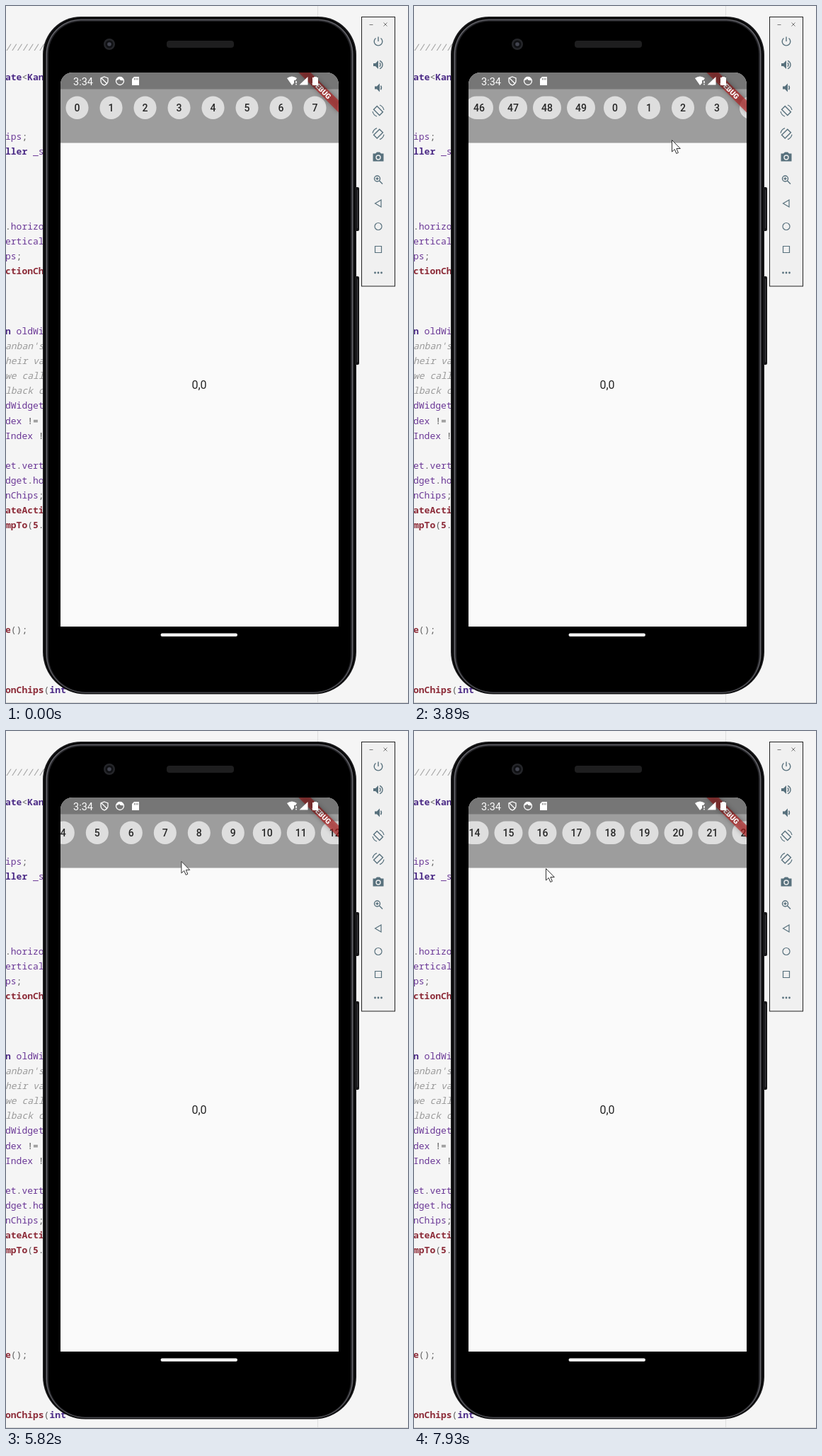
Recreate the animation shown at these times as an HTML page with a canvas. Size 568 by 985 pixels, loop 8 s.

```html
<!DOCTYPE html>
<html lang="en">
<head>
<meta charset="utf-8">
<title>Chip scroller</title>
<style>
html, body { margin: 0; width: 100%; height: 100%; overflow: hidden; background: #f5f5f5; }
canvas { display: block; }
</style>
</head>
<body>
<canvas id="stage" width="568" height="985"></canvas>
<script>
const ctx = document.getElementById('stage').getContext('2d');
const LOOP = 8000, PITCH = 48, CHIPS = 50, FIRST_CHIP = 100.5;
const SCREEN = { x: 77, y: 94, w: 393, h: 783 };
const ENTRY = { time: 910, at: [491, 961] };
const TOUCH_DELAY = 70, PRESS_LEAD = 60;

// The pointer curves past "via" to "from", then drags to "to"; the list follows by "shift" and coasts to "settle".
const SWIPES = [
  { arrive: 1600, start: 2343, release: 2575, settle: 2720, via: [353, 247], from: [182, 171], to: [350, 171], shift: 183.5 },
  { arrive: 3650, start: 3990, release: 4250, settle: 4440, via: [43, 70], from: [364, 189], to: [236, 186], shift: -126 },
  { arrive: 4510, start: 4580, release: 4810, settle: 5000, via: [320, 180], from: [352, 178], to: [228, 174], shift: -126 },
  { arrive: 5250, start: 5390, release: 5650, settle: 5850, via: [313, 133], from: [366, 184], to: [225, 190], shift: -144 },
  { arrive: 6290, start: 6440, release: 6834, settle: 7200, via: [255, 175], from: [374, 186], to: [190, 190], shift: -274 },
  { arrive: 7240, start: 7440, release: 7860, settle: 7930, via: [300, 180], from: [388, 187], to: [186, 194], shift: -200.5 }
];

const LINE_HEIGHT = 21.12;
const CODE = `///////

ate<Kan



ips;
ller _s




.horizo
ertical
ps;
ctionCh



n oldWi
anban's
heir va
we call
lback c
dWidget
dex !=
Index !

et.vert
dget.ho
nChips;
ateActi
mpTo(5.






e();



onChips(int`.split('\n');
const COMMENT = /^(\/\/|anban|heir|we |lback)/;
const KEYWORD = /^(ate|Kan|ller|n|int)$/;
const CALL = /^(ctionCh|ateActi|mpTo|5|e|onChips)$/;

const clamp = u => Math.min(1, Math.max(0, u));
const progress = (t, a, b) => clamp((t - a) / (b - a));
const easeOut = u => 1 - (1 - u) ** 2;
const mix = (p, q, u) => p.map((v, i) => v + (q[i] - v) * u);
const curve = (p, via, q, u) => mix(mix(p, via, u), mix(via, q, u), u);

function scrollAt(t) {
  return SWIPES.reduce((x, s) => x + s.shift * easeOut(progress(t, s.start + TOUCH_DELAY, s.settle)), FIRST_CHIP);
}
function pointerAt(t) {
  let { time, at } = ENTRY;
  for (const s of SWIPES) {
    if (t < s.arrive) return curve(at, s.via, s.from, progress(t, time, s.arrive));
    if (t < s.release) return mix(s.from, s.to, progress(t, s.start, s.release));
    time = s.release;
    at = s.to;
  }
  return at;
}

function fillRect(color, x, y, w, h) {
  ctx.fillStyle = color;
  ctx.fillRect(x, y, w, h);
}
function rounded(color, x, y, w, h, r) {
  ctx.fillStyle = color;
  ctx.beginPath();
  ctx.roundRect(x, y, w, h, r);
  ctx.fill();
}
function disc(color, x, y, r) {
  ctx.fillStyle = color;
  ctx.beginPath();
  ctx.arc(x, y, r, 0, Math.PI * 2);
  ctx.fill();
}
function text(str, x, y, font, color, align = 'center') {
  ctx.font = font;
  ctx.fillStyle = color;
  ctx.textAlign = align;
  ctx.fillText(str, x, y);
}
function shape(x, y, d, { fill, stroke, width = 1.5, turn = 0 }) {
  ctx.save();
  ctx.translate(x, y);
  ctx.rotate(turn);
  const path = new Path2D(d);
  if (fill) { ctx.fillStyle = fill; ctx.fill(path); }
  if (stroke) { ctx.strokeStyle = stroke; ctx.lineWidth = width; ctx.stroke(path); }
  ctx.restore();
}

function codeStyle(line, word) {
  if (COMMENT.test(line)) return ['italic', '#9a9a9a'];
  if (KEYWORD.test(word)) return ['bold', '#4b2a86'];
  if (CALL.test(word)) return ['bold', '#8c2b38'];
  return ['', /\w/.test(word) ? '#6a3796' : '#5f5f5f'];
}
function drawEditor() {
  fillRect('#f5f5f5', 0, 0, 568, 985);
  fillRect('#dedede', 440, 0, 1, 985);
  fillRect('#d4d4d4', 0, 984, 568, 1);
  CODE.forEach((line, row) => {
    let x = -1;
    for (const word of line.match(/\w+|\W/g) || []) {
      const [style, color] = codeStyle(line, word);
      text(word, x, 62.5 + row * LINE_HEIGHT, style + ' 13px "Noto Sans Mono", monospace', color, 'left');
      x += ctx.measureText(word).width;
    }
  });
}

function drawPhone() {
  for (const [y, h] of [[256, 62], [382, 125]]) {
    rounded('#161618', 490, y, 9, h, 2);
    fillRect('#3c3c40', 496, y + 4, 1, h - 8);
  }
  const rims = [[0, '#1c1c1e'], [1.5, '#09090a'], [4.5, '#66666c'], [6, '#2a2a2e'], [8, '#000']];
  for (const [d, color] of rims) {
    const top = 54 - d, bottom = 60 - d;
    rounded(color, 52 + d, 15 + d * 0.85, 443 - d * 2, 957.5 - d * 1.25, [top, top, bottom, bottom]);
  }
  disc('#25262a', 146, 54, 8);
  disc('#101114', 146, 54, 5.5);
  disc('#42444f', 146, 54, 2.8);
  rounded('#1e1e1f', 227, 49, 95, 10, 4);
  rounded('#f2f2f2', 218.5, 886.5, 108.5, 4.5, 2.2);
}

function drawChips(zero) {
  const first = Math.floor((SCREEN.x - 24 - zero) / PITCH);
  for (let i = first; i < first + 11; i++) {
    const label = String((i % CHIPS + CHIPS) % CHIPS);
    const x = zero + i * PITCH, w = label.length > 1 ? 40 : 32;
    rounded('#dedede', x - w / 2, 127.5, w, 32.5, 16.2);
    text(label, x, 149, '500 14px Roboto, sans-serif', '#262626');
  }
}

function drawBanner() {
  ctx.save();
  ctx.translate(SCREEN.x + SCREEN.w, SCREEN.y);
  ctx.rotate(Math.PI / 4);
  ctx.shadowColor = 'rgba(0,0,0,.5)';
  ctx.shadowBlur = 6;
  fillRect('rgba(183,28,28,.63)', -40, 28, 80, 12);
  ctx.shadowBlur = 0;
  ctx.shadowColor = 'transparent';
  text('DEBUG', 0, 37.7, '900 10.2px Roboto, sans-serif', '#fff');
  ctx.restore();
}

function drawStatus() {
  const fill = '#fff', thin = { stroke: fill, width: 1.3 };
  fillRect('rgba(0,0,0,.25)', SCREEN.x, SCREEN.y, SCREEN.w, 23.5);
  text('3:34', 95, 111.5, '14.5px Roboto, sans-serif', fill, 'left');
  shape(139, 106, 'M0-6L5-4V0Q5 4 0 6Q-5 4-5 0V-4ZM-4-4L4 4', thin);
  shape(161, 106, 'M5.5 0A5.5 5.5 0 1 1-5.5 0A5.5 5.5 0 1 1 5.5 0', thin);
  shape(161, 106, 'M-5-1A5 5 0 0 1 5-1Q0 0-1-3Q-2-1-5-1Z', { fill });
  shape(183, 106, 'M-2-6H5V6H-5V-3Z', { fill });
  shape(183, 106, 'M-1.5-4V-1.5M.8-4V-1.5M3-4V-1.5', { stroke: '#777', width: 1 });
  shape(404, 106, 'M-7-4Q0-9 7-4L5-1H3V3L0 6Z', { fill });
  shape(410, 106, 'M0 0V3M0 4V5.5', { stroke: fill });
  shape(421, 106, 'M5.5-6V5.5H-6.5Z', { fill });
  shape(437, 106, 'M-2-6H2V-5H4V6H-4V-5H-2Z', { fill });
}

function drawScreen(zero) {
  ctx.save();
  ctx.beginPath();
  ctx.roundRect(SCREEN.x, SCREEN.y, SCREEN.w, SCREEN.h, [17, 17, 0, 0]);
  ctx.clip();
  fillRect('#fafafa', SCREEN.x, SCREEN.y, SCREEN.w, SCREEN.h);
  fillRect('#9d9d9d', SCREEN.x, SCREEN.y, SCREEN.w, 99.5);
  drawChips(zero);
  text('0,0', 273, 541, '16px Roboto, sans-serif', '#262626');
  drawBanner();
  drawStatus();
  ctx.restore();
}

function drawToolbar() {
  const x = 526, slate = '#58717d';
  const line = { stroke: slate, width: 1.4 }, thin = { stroke: slate, width: 1.2 }, solid = { fill: slate };
  const small = { stroke: '#777', width: 1 };
  fillRect('#f0f0f0', 502, 15, 48, 381);
  ctx.strokeStyle = '#222';
  ctx.lineWidth = 1;
  ctx.strokeRect(502.5, 15.5, 47, 380.5);
  shape(516, 26, 'M-2.5.5H2.5', small);
  shape(536, 26, 'M-2.5-2.5L2.5 2.5M2.5-2.5L-2.5 2.5', small);
  shape(x, 50, 'M0-6.5V0M-3.5-4.5A5.8 5.8 0 1 0 3.5-4.5', line);
  shape(x, 83, 'M-7-2H-4L0-6V6L-4 2H-7Z', solid);
  shape(x, 83, 'M2-2.8Q4 0 2 2.8M2-5.7Q6-4 6 0T2 5.7', line);
  shape(x, 115.5, 'M-5-2H-2L2-6V6L-2 2H-5Z', solid);
  shape(x, 115.5, 'M3.5-2.8Q5.5 0 3.5 2.8', line);
  for (const side of [1, -1]) {
    const y = 164.3 - side * 16.3;
    shape(x, y, 'M-3.3-5.8H3.3V5.8H-3.3Z', { ...line, turn: -side * Math.PI / 4 });
    shape(x, y, side > 0 ? 'M2-8Q7-6 8-1M-2 8Q-7 6-8 1' : 'M-2-8Q-7-6-8-1M2 8Q7 6 8 1', thin);
  }
  shape(x, 213, 'M-7.5-4.5H-4L-2-6.5H2L4-4.5H7.5V6.5H-7.5Z', solid);
  disc('#f0f0f0', x, 214, 3.7);
  disc(slate, x, 214, 2.3);
  shape(x, 246, 'M2.5-2A4 4 0 1 1-5.5-2A4 4 0 1 1 2.5-2M1.5 1L6 5.5M-3.5-2H.5M-1.5-4V0', line);
  shape(x, 279, 'M4-5V5L-4.5 0Z', thin);
  shape(x, 311.5, 'M5 0A5 5 0 1 1-5 0A5 5 0 1 1 5 0', thin);
  shape(x, 344, 'M-4.5-4.5H4.5V4.5H-4.5Z', thin);
  for (const d of [-4.5, 0, 4.5]) disc(slate, x + d, 377, 1.4);
}

function drawPointer(t) {
  if (t < ENTRY.time) return;
  const [x, y] = pointerAt(t);
  const pressed = SWIPES.some(s => t >= s.start - PRESS_LEAD && t < s.release);
  if (pressed) disc('rgba(238,238,10,.6)', x, y, 13.5);
  shape(x + 0.5, y + 0.5, 'M0 0V16.5L3.8 13L6.3 19L8.9 17.8L6.4 12H11.8Z', { fill: '#fff', stroke: '#333', width: 1 });
}

function frame(now) {
  const t = now % LOOP;
  drawEditor();
  drawPhone();
  drawScreen(scrollAt(t));
  drawToolbar();
  drawPointer(t);
  requestAnimationFrame(frame);
}
requestAnimationFrame(frame);
</script>
</body>
</html>
```
